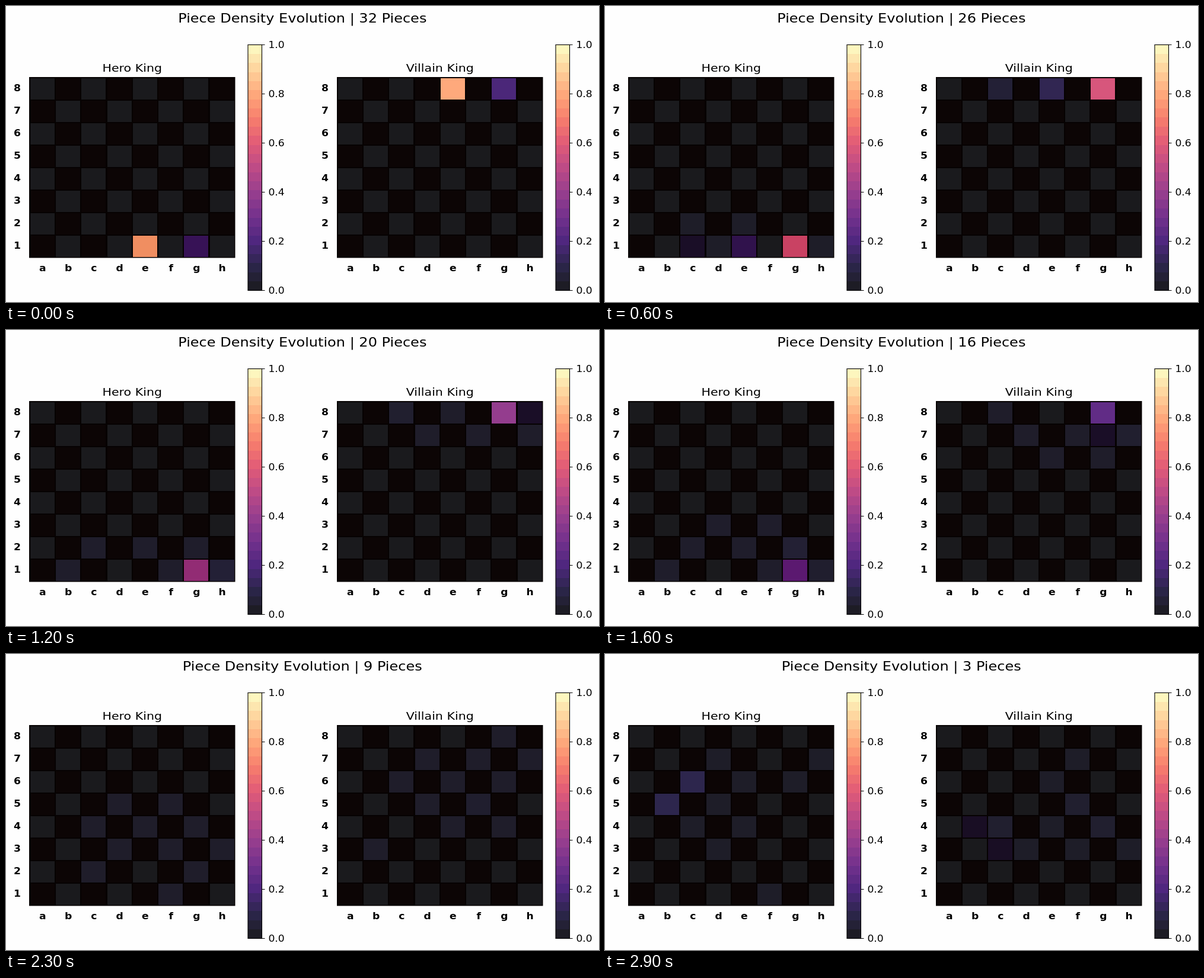
These frames come from a looping animation (1000 by 500 pixels, 3000 ms). An HTML page with a canvas:

```html
<!DOCTYPE html>
<html lang="en">
<head>
<meta charset="utf-8">
<title>Piece Density Evolution</title>
<style>
  html, body { margin: 0; width: 100%; height: 100%; overflow: hidden; background: #fefefe; }
  canvas { display: block; }
</style>
</head>
<body>
<canvas id="stage" width="1000" height="500"></canvas>
<script>
const ctx = document.getElementById('stage').getContext('2d');
const STEP = 100, STEPS = 30;
const ASPECT = 1.138;               // the whole chart is wider than it is tall
const CELL_W = 43.25, CELL_H = 38.06, TOP = 120.5;
const BAR_TOP = 65.5, BAR_H = 415, BANDS = 27;
const FILES = 'abcdefgh';

// Magma colour ramp in equal steps from 0 to 1
const RAMP = ['000004', '140e36', '3b0f70', '641a80', '8c2981', 'b73779',
  'de4968', 'f7705c', 'fe9f6d', 'fecf92', 'fcfdbf']
  .map(h => [0, 2, 4].map(i => parseInt(h.slice(i, i + 2), 16)));
const LIGHT = [255, 255, 255], DARK = [120, 50, 12];

// Percentages, each followed by the squares that have it
const KEY_STEPS = [0, 6, 12, 16, 19, 23, 29];
const HERO = [
  '78.5 e1 17 g1',
  '15 e1 57 g1 2.5 c2 e2 d1 h1 7.5 c1',
  '42 g1 5.5 h1 3 c2 e2 g2 b1 f1',
  '27 g1 5 g2 3 d3 f3 c2 e2 b1 f1 3.8 h1',
  '14 g1 10.5 g2 4.5 h1 2.3 d3 f3 h3 c2 e2 f1 3 b1 7 f2 h2',
  '2.8 d5 f5 c4 e4 g4 d3 f3 h3 c2 g2 f1',
  '10.5 c6 b5 2.5 d7 h7 e6 g6 d5 c4 e4 d3 f1'
].map(parse);
const VILLAIN = [
  '80 e8 19 g8',
  '11.5 e8 57 g8 5.5 c8',
  '39 g8 4 c8 2.8 e8 d7 f7 h7 7.5 h8',
  '25 g8 2.8 c8 d7 f7 e6 g6 4 h7 7.5 g7',
  '11 g8 h7 5.5 f7 g6 9 g7 2.5 e6 f5',
  '2.8 g8 d7 f7 h7 c6 e6 g6 d5 e4 g4 b3 3.8 f5',
  '2.5 f7 e6 e4 d3 f3 h3 4 f5 c4 g4 7 b4 c3'
].map(parse);

function parse(text) {
  const map = {};
  let value = 0;
  for (const word of text.split(' ')) {
    if (isNaN(word)) map[word] = value;
    else value = word / 100;
  }
  return map;
}

function shade(v, base) {
  const i = Math.min(9, Math.floor(v * 10)), f = v * 10 - i;
  const rgb = RAMP[i].map((c, k) =>
    Math.round(0.9 * (c + (RAMP[i + 1][k] - c) * f) + 0.1 * base[k]));
  return `rgb(${rgb})`;
}

function label(text, x, y, size, align = 'center', weight = '') {
  ctx.save();
  ctx.translate(x, y);
  ctx.scale(ASPECT, 1);
  ctx.font = `${weight} ${size}px "DejaVu Sans", sans-serif`;
  ctx.textAlign = align;
  ctx.fillStyle = '#000';
  ctx.fillText(text, 0, 0);
  ctx.restore();
}

function board(left, name, keys, step) {
  let k = 0;
  while (k < KEY_STEPS.length - 2 && step >= KEY_STEPS[k + 1]) k++;
  const mix = (step - KEY_STEPS[k]) / (KEY_STEPS[k + 1] - KEY_STEPS[k]);

  label(name, left + 173, 111, 18.1);
  ctx.fillStyle = '#060202';
  ctx.fillRect(left - 0.75, TOP - 0.5, CELL_W * 8 + 1.5, CELL_H * 8 + 1);
  for (let row = 0; row < 8; row++) {
    const y = TOP + row * CELL_H;
    label(8 - row, left - 20.7, y + 23.5, 15.1, 'center', 'bold');
    for (let col = 0; col < 8; col++) {
      const square = FILES[col] + (8 - row);
      const a = keys[k][square] || 0, b = keys[k + 1][square] || 0;
      const x = Math.round(left + col * CELL_W + 1.2);
      ctx.fillStyle = shade(a + (b - a) * mix, (row + col) % 2 ? DARK : LIGHT);
      ctx.fillRect(x, Math.round(y + 1), 41, 36);
    }
  }
  for (let col = 0; col < 8; col++)
    label(FILES[col], left + (col + 0.5) * CELL_W + 0.5, 448, 15.1, 'center', 'bold');
}

function colorBar(x) {
  const h = BAR_H / BANDS;
  for (let i = 0; i < BANDS; i++) {
    ctx.fillStyle = shade(1 - (i + 0.5) / BANDS, LIGHT);
    const y = Math.round(BAR_TOP + i * h);
    ctx.fillRect(x, y, 23, Math.round(BAR_TOP + (i + 1) * h) - y);
  }
  ctx.strokeStyle = '#000';
  ctx.lineWidth = 1.1;
  ctx.strokeRect(x, BAR_TOP, 23.5, BAR_H);
  for (let i = 0; i <= 5; i++) {
    const y = BAR_TOP + BAR_H - i * BAR_H / 5;
    ctx.fillStyle = '#000';
    ctx.fillRect(x + 23.5, Math.round(y - 0.5), 5, 1);
    label((i / 5).toFixed(1), x + 34.4, y + 5.7, 15.1, 'left');
  }
}

function draw() {
  const step = Math.floor(performance.now() / STEP) % STEPS;
  ctx.fillStyle = '#fefefe';
  ctx.fillRect(0, 0, 1000, 500);
  label(`Piece Density Evolution | ${32 - step} Pieces`, 499.8, 28, 21.1);
  board(39.75, 'Hero King', HERO, step);
  board(558.75, 'Villain King', VILLAIN, step);
  colorBar(408);
  colorBar(927);
  requestAnimationFrame(draw);
}
draw();
</script>
</body>
</html>
```
